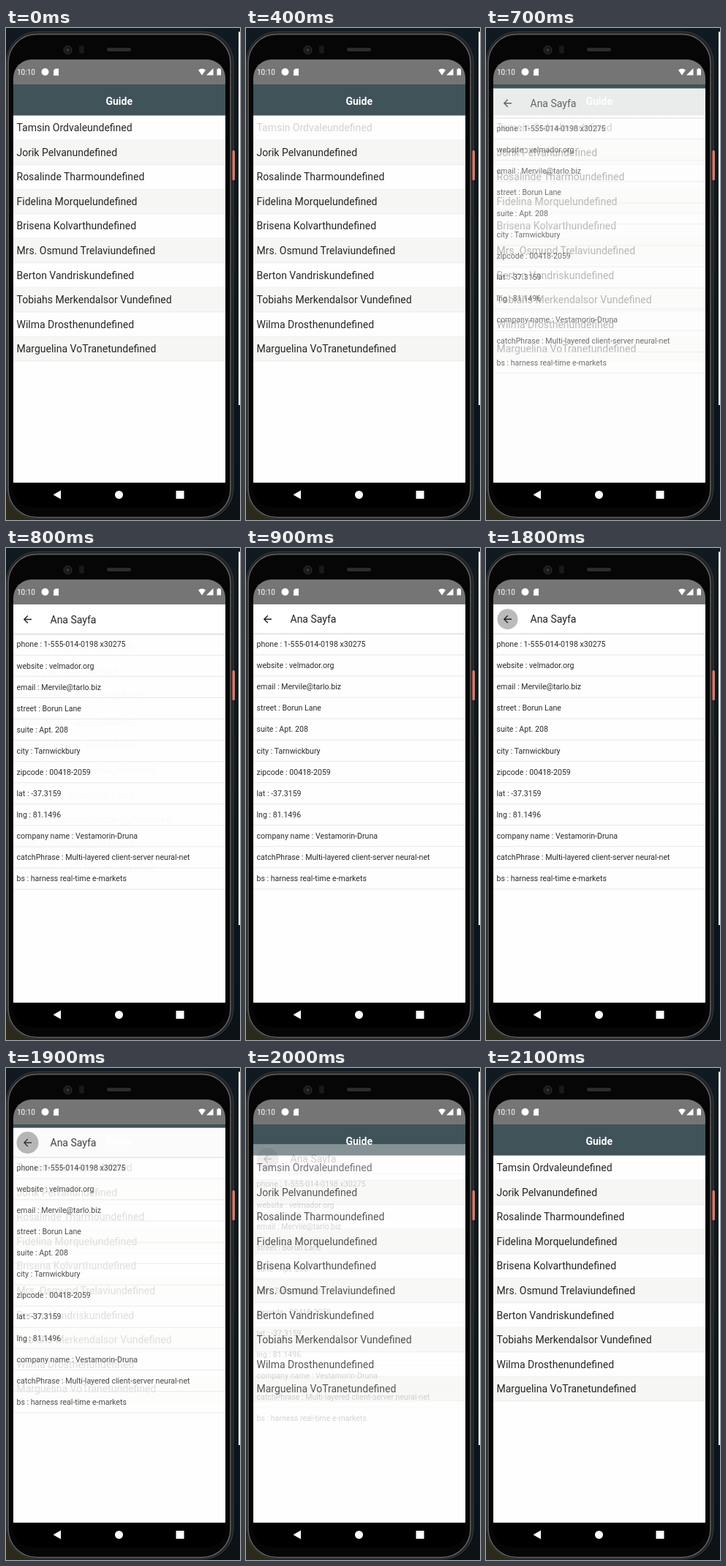
Animation, 320 px wide and 672 px high, one loop 4700 ms. Source, as an HTML page:

```html
<!DOCTYPE html>
<html lang="en">
<head>
<meta charset="utf-8">
<title>Guide</title>
<style>
  html, body { margin: 0; height: 100%; overflow: hidden; background: #0b1319; }
  svg { display: block; width: 320px; height: 672px; }
  text { font: 14px Roboto, sans-serif; white-space: pre; }
  #list text { fill: #262626; }
  /* Each piece fades on its own, so stacked backgrounds stay denser than text. */
  #detail * { opacity: var(--alpha); }
  #fields text { font-size: 10.6px; fill: #2b2b2b; }
</style>
</head>
<body>
<svg viewBox="0 0 320 672">
  <defs>
    <clipPath id="glass"><rect x="10" y="43" width="290" height="612" rx="25"/></clipPath>
    <clipPath id="content"><rect x="10" y="77" width="290" height="544"/></clipPath>
    <linearGradient id="backdrop" x2="0" y2="1">
      <stop stop-color="#101a20"/><stop offset=".85" stop-color="#0a151d"/><stop offset="1" stop-color="#0b1216"/>
    </linearGradient>
    <linearGradient id="shade" x2="0" y2="1">
      <stop stop-color="#000" stop-opacity=".16"/><stop offset="1" stop-color="#000" stop-opacity="0"/>
    </linearGradient>
  </defs>

  <rect width="320" height="672" fill="url(#backdrop)"/>
  <rect y="640" width="40" height="32" fill="#2c2a1c"/>
  <rect x="318" y="5" width="2" height="510" fill="#f8f8f8"/>

  <g id="phone">
    <rect x=".5" y="5" width="310.500" height="666" rx="42" fill="#222" stroke="#3c3c3c"/>
    <rect x="3" y="8.500" width="304" height="660" rx="39" fill="#060606" stroke="#636363" stroke-width="1.500"/>
    <rect x="309.500" y="167" width="3.500" height="41" rx="1.500" fill="#d9786b"/>
    <rect x="309.500" y="252" width="3" height="81" rx="1.500" fill="#26282a"/>
    <circle cx="84.500" cy="30" r="5.500" fill="#17181a" stroke="#333"/>
    <circle cx="84.500" cy="30" r="2" fill="#34373c"/>
    <rect x="100" y="24" width="7" height="11" rx="3" fill="#17181a"/>
    <rect x="138" y="27" width="33" height="5" rx="2.500" fill="#2b2b2b"/>
  </g>

  <g clip-path="url(#glass)">
    <rect x="10" y="43" width="290" height="34.500" fill="#757575"/>
    <rect x="10" y="77" width="290" height="544" fill="#fefefe"/>
    <rect x="10" y="621" width="290" height="34" fill="#000"/>

    <g clip-path="url(#content)">
      <g id="list">
        <rect x="10" y="77" width="290" height="42.500" fill="#405359"/>
        <text x="154.700" y="104.700" text-anchor="middle" style="font-weight:700;fill:#fff">Guide</text>
      </g>
      <g id="detail">
        <rect x="10" y="77" width="290" height="600" fill="#fefefe"/>
        <rect x="10" y="77" width="290" height="39.500" fill="#fff"/>
        <rect x="10" y="116.500" width="290" height="2.500" fill="url(#shade)"/>
        <circle id="ripple" cx="29.500" cy="97.200"/>
        <path d="M35 97.200H24.800M29.800 92.200l-5 5 5 5" fill="none" stroke="#222" stroke-width="1.400"/>
        <text x="60.500" y="102.300" fill="#222">Ana Sayfa</text>
        <g id="fields" style="opacity:1"></g>
      </g>
    </g>

    <g fill="#fff">
      <text x="15" y="63.700" style="font-size:10px">10:10</text>
      <circle cx="53.500" cy="60" r="5"/>
      <path d="M67.500 55.500H72V65H65V58z"/>
      <path d="M263 57.500Q268 53.500 273 57.500L268 64.500z"/>
      <path d="M283.500 55V64.500H274z"/>
      <path d="M290 55h2.500v1h1.500v8.500h-5.500V56H290z"/>
      <path d="M75 631.500v12L64.500 637.500z"/>
      <circle cx="154.500" cy="637.500" r="5.500"/>
      <rect x="232.500" y="632" width="11" height="11" rx=".5"/>
    </g>
  </g>
</svg>

<script>
const people = [
  "Tamsin Ordvale", "Jorik Pelvan", "Rosalinde Tharmo", "Fidelina Morquel", "Brisena Kolvarth",
  "Mrs. Osmund Trelavi", "Berton Vandrisk", "Tobiahs Merkendalsor V", "Wilma Drosthen", "Marguelina VoTranet"
];
const fields = [
  "phone : 1-555-014-0198 x30275", "website : velmador.org", "email : Mervile@tarlo.biz",
  "street : Borun Lane", "suite : Apt. 208", "city : Tarnwickbury", "zipcode : 00418-2059",
  "lat : -37.3159", "lng : 81.1496", "company name : Vestamorin-Druna",
  "catchPhrase : Multi-layered client-server neural-net", "bs : harness real-time e-markets"
];
const LOOP = 4700;

const byId = id => document.getElementById(id);

function add(parent, tag, attrs, content = "") {
  const node = document.createElementNS("http://www.w3.org/2000/svg", tag);
  for (const key in attrs) node.setAttribute(key, attrs[key]);
  node.textContent = content;
  return parent.appendChild(node);
}

const band = (parent, y, height, fill) => add(parent, "rect", { x: 10, y, width: 290, height, fill });

const names = people.map((name, i) => {
  const y = 119.5 + i * 33.55;
  if (i % 2) band(byId("list"), y, 33.55, "#f6f6f5");
  band(byId("list"), y + 33, 1, "#ececec");
  return add(byId("list"), "text", { x: 14.5, y: y + 21.7 }, name + "undefined");
});

fields.forEach((field, i) => {
  const y = 117 + i * 29.07;
  add(byId("fields"), "text", { x: 14.5, y: y + 18.2 }, field);
  band(byId("fields"), y + 28.5, 1, "#e8e8e8");
});

// The screen refreshes in hard steps; every pose holds until the next one.
const poses = [
  { at: 0 },
  { at: 300, press: .6 },
  { at: 400, press: .2 },
  { at: 700, press: .6, alpha: .67, shift: 5.6 },
  { at: 800, alpha: .98, shift: .3 },
  { at: 900, alpha: 1 },
  { at: 1700, alpha: 1, ripple: 7.5, ink: .16 },
  { at: 1800, alpha: 1, ripple: 14, ink: .27 },
  { at: 1900, alpha: .85, shift: 4.8, ripple: 15, ink: .32 },
  { at: 2000, alpha: .2, shift: 27, ripple: 15, ink: .32 },
  { at: 2100 }
];

function draw(now) {
  const time = now % LOOP;
  const { press = 1, alpha = 0, shift = 0, ripple = 0, ink = 0 } = poses.findLast(pose => pose.at <= time);
  names[0].style.opacity = press;
  byId("detail").style.setProperty("--alpha", alpha);
  byId("detail").setAttribute("transform", `translate(0 ${shift})`);
  byId("ripple").setAttribute("r", ripple);
  byId("ripple").setAttribute("fill", `rgba(0,0,0,${ink})`);
  requestAnimationFrame(() => draw(performance.now()));
}
draw(0);
</script>
</body>
</html>
```
